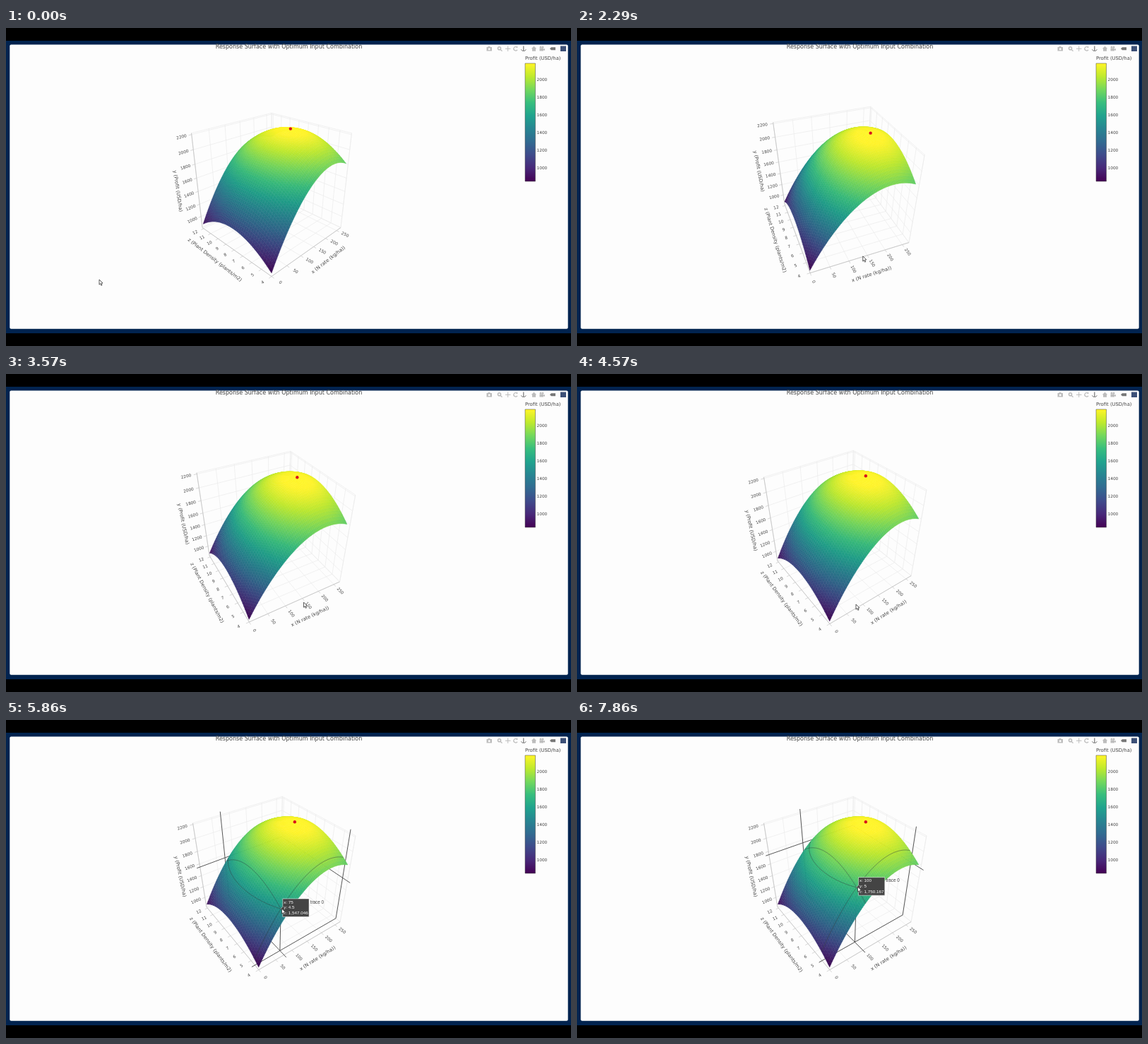
Recreate the animation shown at these times as an HTML page with a canvas. Size 800 by 450 pixels, loop 8 s.

```html
<!DOCTYPE html>
<html lang="en">
<head>
<meta charset="utf-8">
<title>Response surface</title>
<style>
  html, body { margin: 0; width: 100%; height: 100%; overflow: hidden; background: #000; }
  canvas { display: block; width: 800px; height: 450px; }
</style>
</head>
<body>
<canvas></canvas>
<script>
const LOOP = 8000, STEP = 1000 / 7;
const canvas = document.querySelector('canvas');
const ctx = canvas.getContext('2d');
const dpr = window.devicePixelRatio || 1;
canvas.width = 800 * dpr;
canvas.height = 450 * dpr;
ctx.scale(dpr, dpr);

const SANS = '"DejaVu Sans", Verdana, sans-serif';
const ARIAL = '"Liberation Sans", Arial, sans-serif';

// time, azimuth, elevation, pointer x, pointer y
const KEYS = [
  [0, 45, 26.6, 132, 356],
  [1286, 45, 26.6, 455, 301],
  [1430, 45, 26.6, 455, 301],
  [2290, 69, 36.87, 404.5, 323],
  [2600, 70.5, 36.87, 401, 323],
  [3570, 61.1, 36.87, 421.5, 323],
  [4290, 54.1, 36.87, 434, 323],
  [4430, 54.1, 36.87, 434, 323],
  [4571, 54.1, 36.87, 395, 326],
  [5000, 54.1, 36.87, 391, 269],
  [5860, 54.1, 36.87, 390.5, 267],
  [7860, 54.1, 36.87, 397.5, 236]
];

// start, N rate, density, shown profit
const HOVERS = [
  [5000, 75, 4.5, '1,547.046'],
  [6857, 100, 5, '1,750.167']
];

const VIRIDIS = ['440154', '482878', '3e4989', '31688e', '26828e', '1f9e89', '35b779', '6ece58', 'b5de2b', 'fde725']
  .map(h => [0, 2, 4].map(i => parseInt(h.slice(i, i + 2), 16)));

const LOW = 848, PEAK = 2184, N_TOP = 205, Z_TOP = 8.1;
const A = 0.02468, B = 16.9;
const MARK = [210, 8.3];
const profit = (n, z) => PEAK - A * (n - N_TOP) ** 2 - B * (z - Z_TOP) ** 2;

// Data to box coordinates, each axis running from -0.5 to 0.5
const toU = n => n / 270 - 0.5;
const toV = z => (z - 4) / 8.2 - 0.5;
const toW = y => (y - 812) / 1406 - 0.5;
const range = (from, to, step) => Array.from({ length: Math.round((to - from) / step) + 1 }, (_, i) => from + i * step);

// `path` is the line drawn on two faces of the box for one value of the axis
const AXES = [
  { title: 'x (N rate (kg/ha))', ticks: range(0, 250, 50), norm: toU, out: [0, -1],
    at: s => [s, -0.5, -0.5],
    path: (s, e) => [[s, -e, -0.5], [s, 0.5, -0.5], [s, 0.5, e]] },
  { title: 'z (Plant Density (plants/m2)', ticks: range(4, 12, 1), norm: toV, out: [-1, 0],
    at: s => [-0.5, s, -0.5],
    path: (s, e) => [[-e, s, -0.5], [0.5, s, -0.5], [0.5, s, e]] },
  { title: 'y (Profit (USD/ha)', ticks: range(1000, 2200, 200), norm: toW, out: [-1, 0],
    at: s => [-0.5, 0.5, s],
    path: (s, e) => [[-e, 0.5, s], [0.5, 0.5, s], [0.5, -e, s]] }
];

let cam;
function setCamera(azimuth, elevation) {
  const a = azimuth * Math.PI / 180, e = elevation * Math.PI / 180;
  cam = { sa: Math.sin(a), ca: Math.cos(a), se: Math.sin(e), ce: Math.cos(e) };
}

function project([u, v, w]) {
  const right = u * cam.sa - v * cam.ca;
  const ahead = u * cam.ca + v * cam.sa;
  const k = 455 / (3.06 + ahead * cam.ce - w * cam.se);
  return [376 + right * k, 220.5 - (w * cam.ce + ahead * cam.se) * k];
}

const onSurface = (n, z) => project([toU(n), toV(z), toW(profit(n, z))]);

function poly(points, stroke, width, fill) {
  ctx.beginPath();
  points.forEach(p => ctx.lineTo(p[0], p[1]));
  if (fill) {
    ctx.closePath();
    ctx.fillStyle = fill;
    ctx.fill();
  }
  if (stroke) {
    ctx.strokeStyle = stroke;
    ctx.lineWidth = width;
    ctx.stroke();
  }
}

function box(x, y, w, h, fill) {
  ctx.fillStyle = fill;
  ctx.fillRect(x, y, w, h);
}

function dot(x, y, r, fill) {
  ctx.beginPath();
  ctx.arc(x, y, r, 0, 7);
  ctx.fillStyle = fill;
  ctx.fill();
}

function text(str, x, y, size, { angle = 0, align = 'left', fill = '#444', font = SANS } = {}) {
  ctx.save();
  ctx.translate(x, y);
  ctx.rotate(angle);
  ctx.font = `${size}px ${font}`;
  ctx.textAlign = align;
  ctx.textBaseline = 'middle';
  ctx.fillStyle = fill;
  ctx.fillText(str, 0, 0);
  ctx.restore();
}

// Screen angle of a line, kept readable from left to right
function slope(p, q) {
  const s = q[0] < p[0] ? -1 : 1;
  return Math.atan2(s * (q[1] - p[1]), s * (q[0] - p[0]));
}

function colour(t, dim = 0) {
  const f = Math.min(Math.max(t, 0), 1) * 9, i = Math.min(f | 0, 8);
  const light = 1 - dim * (1 - t) + 0.06 * t;
  const rgb = VIRIDIS[i].map((c, j) => Math.min(255, (c + (VIRIDIS[i + 1][j] - c) * (f - i)) * light));
  return `rgb(${rgb.map(Math.round)})`;
}

function drawPage() {
  box(0, 0, 800, 450, '#000');
  box(0, 18, 800, 414, '#01234f');
  ctx.beginPath();
  ctx.roundRect(5.3, 23.5, 790.4, 402.3, 2);
  ctx.fillStyle = '#fdfdfd';
  ctx.fill();
  text('Response Surface with Optimum Input Combination', 400.5, 26.8, 8, { align: 'center' });
  text('Profit (USD/ha)', 735, 43.5, 6.8);
  const g = ctx.createLinearGradient(0, 217, 0, 50);
  range(0, 9, 1).forEach(i => g.addColorStop(i / 9, colour(i / 9)));
  poly([[735, 50], [749.5, 50], [749.5, 217], [735, 217], [735, 50]], '#444', 0.5, g);
  range(1000, 2000, 200).forEach(v => text(v, 751.5, 198 - (v - 1000) / 8, 5.8));
}

function drawToolbar() {
  const grey = '#bdbdbd', dark = '#777', paper = '#fdfdfd';
  box(680.5, 27, 7.5, 5.5, grey);
  box(682.5, 26, 3, 1.5, grey);
  dot(684.2, 29.7, 1.5, paper);
  dot(698.5, 28.7, 2.8, grey);
  dot(698.5, 28.7, 1.2, paper);
  poly([[700, 30.3], [702.5, 32.8]], grey, 1.3);
  poly([[707, 29.3], [714.5, 29.3]], grey, 1);
  poly([[710.7, 25.5], [710.7, 33]], grey, 1);
  ctx.beginPath();
  ctx.arc(721.7, 29.3, 2.8, 0.6, 5.4);
  ctx.strokeStyle = grey;
  ctx.lineWidth = 1.2;
  ctx.stroke();
  dot(723.5, 27, 1.1, grey);
  poly([[732.8, 25.5], [732.8, 32]], dark, 1.2);
  poly([[729.3, 30.3], [731, 32.3], [734.7, 32.3], [736.3, 30.3]], dark, 1);
  poly([[743.7, 29.3], [747.5, 25.7], [751.3, 29.3], [750, 29.3], [750, 32.7], [745, 32.7], [745, 29.3]], null, 0, grey);
  box(755.5, 28.5, 5.5, 4, grey);
  dot(757, 27.2, 1.4, grey);
  dot(760, 27.2, 1.4, grey);
  poly([[761, 30], [763, 28.7], [763, 32.3], [761, 31]], null, 0, grey);
  poly([[770, 29.3], [772, 27.3], [778, 27.3], [778, 31.3], [772, 31.3]], null, 0, dark);
  box(785, 25.5, 8, 7.5, '#3c5077');
}

function drawAxes() {
  for (const { ticks, norm, path } of AXES) {
    for (const s of [-0.5, ...ticks.map(norm), 0.5]) poly(path(s, 0.5).map(project), '#ebebeb', 0.7);
  }
  for (const { title, ticks, norm, out, at } of AXES) {
    const off = (s, k) => {
      const [u, v, w] = at(s);
      return project([u + out[0] * k, v + out[1] * k, w]);
    };
    poly([off(-0.5, 0), off(0.5, 0)], '#c0c0c0', 0.8);
    for (const value of ticks) {
      const s = norm(value), base = off(s, 0), pos = off(s, 0.1);
      poly([base, off(s, 0.03)], '#c8c8c8', 0.7);
      text(value, ...pos, 5.8, { align: 'center', angle: slope(base, pos) });
    }
    text(title, ...off(0, 0.21), 6.8, { align: 'center', angle: slope(off(-0.1, 0.21), off(0.1, 0.21)) });
  }
}

function drawSpikes([, n, z]) {
  const y = profit(n, z), at = [n, z, y].map((value, i) => AXES[i].norm(value));
  AXES.forEach(({ path }, i) => poly(path(at[i], 0.533).map(project), '#444', 0.9));
  poly([project(at), project([at[0], at[1], -0.5])], '#444', 0.9);
}

// Both horizontal axes run away from the viewer, so far rows come first
function drawSurface() {
  const ns = range(0, 260, 4), zs = range(4, 12, 0.2);
  const pts = ns.map(n => zs.map(z => onSurface(n, z)));
  for (let i = ns.length - 2; i >= 0; i--) {
    for (let j = zs.length - 2; j >= 0; j--) {
      const c = colour((profit(ns[i] + 2, zs[j] + 0.1) - LOW) / (PEAK - LOW), 0.12);
      poly([pts[i][j], pts[i + 1][j], pts[i + 1][j + 1], pts[i][j + 1], pts[i][j]], c, 0.5, c);
    }
  }
}

function drawContours([, n, z]) {
  const zs = range(4, 12, 0.1), drop = PEAK - profit(n, z), line = 'rgba(50,60,60,.65)';
  const level = [];
  for (const zz of zs) {
    const rest = drop - B * (zz - Z_TOP) ** 2;
    const nn = N_TOP - Math.sqrt(rest / A);
    if (nn >= 0) level.push(onSurface(nn, zz));
  }
  poly(zs.map(zz => onSurface(n, zz)), line, 0.7);
  poly(range(0, 260, 4).map(nn => onSurface(nn, z)), line, 0.7);
  poly(level, line, 0.7);
}

function drawTip([, n, z, value]) {
  const [px, py] = onSurface(n, z), x = px + 2.5, y = py - 14.3;
  const w = 37.3, h = 25.5, mid = y + h / 2 + 1;
  poly([[x, y], [x + w, y], [x + w, y + h], [x, y + h], [x, mid + 2.5], [x - 2.5, mid], [x, mid - 2.5], [x, y]], '#fff', 0.5, '#444');
  [`x: ${n}`, `y: ${z}`, `z: ${value}`].forEach((row, i) =>
    text(row, x + 1.5, y + 5 + i * 7.8, 6.25, { fill: '#fff', font: ARIAL }));
  text('trace 0', x + w + 1.7, y + 5, 6.3, { font: ARIAL });
}

function drawPointer(x, y) {
  const shape = [[0, 0], [0, 7.2], [1.6, 5.7], [2.8, 8.3], [4, 7.8], [2.9, 5.2], [5, 5], [0, 0]];
  poly(shape.map(([dx, dy]) => [x + dx, y + dy]), '#333', 0.8, '#fff');
}

function stateAt(t) {
  const i = KEYS.findIndex(k => k[0] > t);
  if (i < 0) return KEYS[KEYS.length - 1];
  const p = KEYS[i - 1], q = KEYS[i], f = (t - p[0]) / (q[0] - p[0]);
  return p.map((v, j) => v + (q[j] - v) * f);
}

function draw(t) {
  const [, azimuth, elevation, x, y] = stateAt(t);
  const hover = HOVERS.filter(h => h[0] <= t + 1).pop();
  setCamera(azimuth, elevation);
  ctx.lineJoin = 'round';
  drawPage();
  drawToolbar();
  drawAxes();
  if (hover) drawSpikes(hover);
  drawSurface();
  if (hover) drawContours(hover);
  dot(...onSurface(...MARK), 2.2, '#d8101c');
  if (hover) drawTip(hover);
  drawPointer(x, y);
}

let last = -1;
function tick() {
  const step = Math.floor((performance.now() % LOOP) / STEP + 0.05) % 56;
  if (step !== last) draw(step * STEP);
  last = step;
  requestAnimationFrame(tick);
}
tick();
</script>
</body>
</html>
```
